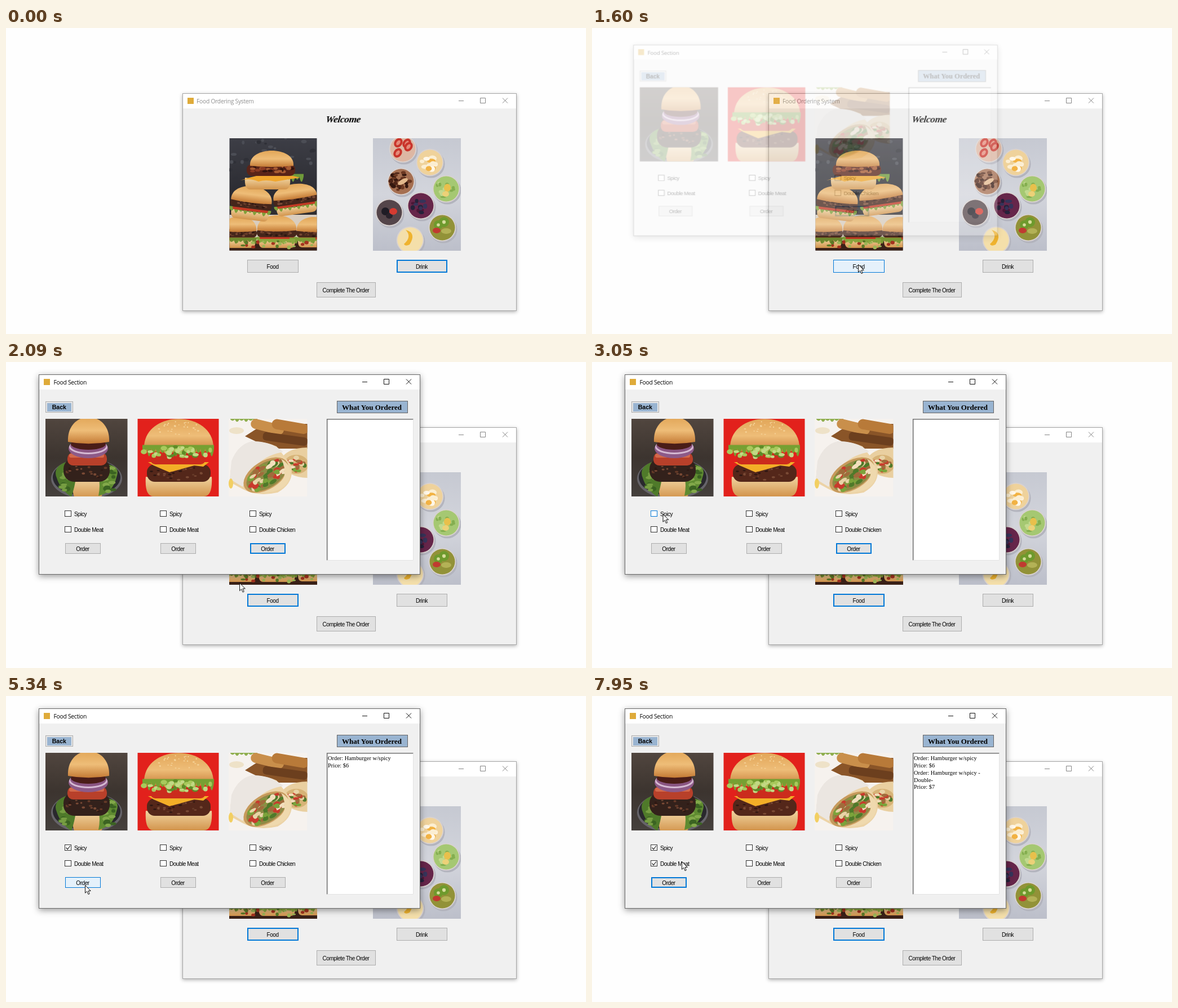
Write an HTML page that moves like this. It is 1029 px wide and 544 px high and loops after 8000 ms.

```html
<!DOCTYPE html>
<html lang="en">
<head>
<meta charset="utf-8">
<title>Food Ordering System</title>
<style>
html, body { margin: 0; width: 100%; height: 100%; overflow: hidden; background: #fefefe; }
#stage { display: block; width: 100vw; height: 100vh; }
text { font: 10px "Liberation Sans", Arial, sans-serif; letter-spacing: -.45px; fill: #000; }
.mid { text-anchor: middle; }
.title { font: 10.3px "Open Sans", "Noto Sans", sans-serif; letter-spacing: -.27px; }
.welcome { font: italic bold 17.5px "Liberation Serif", serif; letter-spacing: -.4px; }
.back { font-weight: bold; font-size: 10.6px; letter-spacing: 0; }
.head { font: bold 13px "Liberation Serif", serif; letter-spacing: 0; }
.list { font: 10.4px "Liberation Serif", serif; letter-spacing: 0; }
.frame { fill: #f0f0f0; stroke: #a6a6a6; filter: drop-shadow(0 2px 3px rgba(0,0,0,.3)); }
.frame.top { stroke: #686868; filter: drop-shadow(0 3px 6px rgba(0,0,0,.4)); }
.icons { fill: none; stroke: #858585; }
.top + .bar + .icons { stroke: #111; }
.bar { fill: #fff; }
.btn { fill: #e1e1e1; stroke: #adadad; }
.ring { fill: none; opacity: var(--ring, 0); }
.box { fill: #fff; stroke: #333; }
.tick { fill: none; stroke: #222; stroke-width: 1.2; }
#foodWin { transform-origin: 397px 200px; }
</style>
</head>
<body>
<svg id="stage" viewBox="0 0 1029 544" preserveAspectRatio="none"></svg>
<script>
const LOOP = 8000;

// ---------- drawing helpers ----------
const rect = (x, y, w, h, attr = '') => `<rect x="${x}" y="${y}" width="${w}" height="${h}" ${attr}/>`;
const text = (x, y, cls, str, id = '') => `<text x="${x}" y="${y}" class="${cls}" id="${id}">${str}</text>`;
const path = (d, fill, attr = '') => `<path d="${d}" fill="${fill}" ${attr}/>`;
const oval = (x, y, rx, ry, fill, attr = '') => `<ellipse cx="${x}" cy="${y}" rx="${rx}" ry="${ry}" fill="${fill}" ${attr}/>`;
const turn = (a, x, y, body) => `<g transform="rotate(${a} ${x} ${y})">${body}</g>`;
const photo = (x, y, w, h, body) =>
  `<svg x="${x}" y="${y}" width="${w}" height="${h}" viewBox="${x} ${y} ${w} ${h}">${body}</svg>`;

let seed = 7;
const rand = () => (seed = seed * 16807 % 2147483647) / 2147483647;
const specks = (n, x, y, rx, ry, fills, r) => Array.from({ length: n }, () => {
  const a = rand() * 6.283, d = Math.sqrt(rand());
  return oval(x + Math.cos(a) * d * rx, y + Math.sin(a) * d * ry, r * (.6 + rand() * .7), r * (.4 + rand() * .5),
    fills[Math.floor(rand() * fills.length)]);
}).join('');

function frill(x, y, w, h, fill) {
  const n = Math.max(3, Math.round(w / 8)), s = w / n;
  let d = `M${x} ${y}`;
  for (let i = 0; i < n; i++) d += `q${s / 2} ${h * (i % 2 ? 2.1 : 1.2)} ${s} 0`;
  return path(`${d}v${-h / 2}H${x}z`, fill);
}
const bunTop = (x, y, w, h) => path(`M${x} ${y + h}C${x - w * .04} ${y - h * .33} ${x + w * 1.04} ${y - h * .33} ${x + w} ${y + h}Q${x + w / 2} ${y + h * 1.15} ${x} ${y + h}z`, 'url(#bun)');
const bunLow = (x, y, w, h) => path(`M${x} ${y}Q${x + w / 2} ${y + h * .3} ${x + w} ${y}q2 ${h} -${w * .12} ${h}H${x + w * .12}q-${w * .14} 0 -${w * .12} -${h}z`, 'url(#low)');
const patty = (x, y, w, h, fill = '#46261b') =>
  rect(x, y, w, h, `rx="${h * .45}" fill="${fill}"`) +
  specks(26, x + w / 2, y + h / 2, w * .45, h * .38, ['#653a28', '#2e1712', '#7a4a35'], 2.4);

function burger(x, y, w, h) {
  return bunLow(x + w * .05, y + h * .72, w * .9, h * .28) +
    frill(x, y + h * .72, w, h * .12, '#7fa03a') +
    rect(x + w * .07, y + h * .64, w * .86, h * .1, 'rx="3" fill="#c23a24"') +
    patty(x, y + h * .4, w, h * .27) + bunTop(x + w * .01, y, w * .98, h * .46);
}

function stack() {
  return rect(396, 196, 156, 200, 'fill="url(#slate)"') +
    specks(40, 474, 240, 85, 50, ['#4b4d55', '#2f3037'], 4) +
    rect(396, 332, 156, 50, 'fill="#d9cdbf"') + rect(396, 378, 156, 18, 'fill="#3a2118"') +
    burger(383, 335, 62, 56) + burger(515, 336, 62, 54) + burger(445, 333, 71, 58) +
    frill(396, 376, 48, 7, '#6f8a2f') + frill(503, 376, 46, 7, '#7d9a35') + frill(447, 378, 66, 6, '#8aa83e') +
    specks(20, 474, 385, 76, 6, ['#5a7a26', '#9db657', '#a5331f'], 4) +
    turn(7, 434, 310, burger(398, 281, 74, 60)) + turn(-8, 514, 305, burger(474, 277, 79, 54)) +
    bunLow(424, 266, 80, 21) + frill(498, 264, 30, 9, '#6f9a3a') +
    path('M416 271Q468 252 522 266Q500 269 478 273Q460 269 448 273Q432 266 416 271z', '#f0a62e') +
    rect(427, 242, 86, 21, 'rx="9" fill="#5a2418"') +
    specks(26, 470, 252, 40, 9, ['#8b3a22', '#32130e', '#a65a32'], 4) + bunTop(433, 218, 77, 27);
}

function cup(x, y, fill, topping) {
  return oval(x + 2, y + 3, 24.5, 24.5, '#b3b4be') + oval(x, y, 24.3, 24.3, '#d9d2d0') +
    oval(x, y, 22.5, 22.5, fill) + topping;
}
const kiwi = (x, y, r) => oval(x, y, r, r, '#6e9a2d') + oval(x, y, r * .35, r * .35, '#d6dc9a');

function drinks() {
  return rect(651, 196, 156, 200, 'fill="url(#stone)"') +
    cup(704, 215, '#ddb7a3', [[696, 204], [711, 205], [695, 222], [714, 211]].map(([x, y]) =>
      turn(35, x, y, oval(x, y, 7, 9, '#c9342b') + oval(x, y, 3, 5, '#e58a79'))).join('')) +
    cup(752, 239, '#efd29b', specks(13, 751, 240, 14, 13, ['#fff7e8', '#f2b243', '#fbeed2'], 6)) +
    cup(701, 273, '#a56f51', specks(32, 699, 272, 17, 16, ['#4d2417', '#34170f', '#6b3822'], 4) +
      turn(-30, 704, 273, oval(704, 273, 10, 4, '#e3b88c'))) +
    cup(781, 286, '#a5c872', specks(14, 778, 287, 16, 15, ['#c2d98f', '#84ae50'], 4) + oval(783, 284, 6, 7, '#e8c04c') + oval(780, 295, 6, 5, '#ecd178')) +
    cup(680, 328, '#54454a', oval(673, 326, 7, 7, '#1f1c25') + oval(680, 334, 6, 5, '#29222b') + oval(687, 326, 7, 6, '#d53b31')) +
    cup(736, 316, '#66264a', specks(13, 732, 318, 13, 13, ['#25223a', '#36345a', '#4a1736'], 5)) +
    cup(774, 355, '#929238', kiwi(777, 345, 9) + kiwi(767, 350, 8) + oval(764, 360, 7, 5, '#c03b30') + oval(781, 361, 9, 5, '#b3b156')) +
    cup(717, 377, '#f4dfaa', path('M709 359Q729 364 716 385Q708 389 706 384Q721 371 709 359z', '#efb32e'));
}

function darkBurger() {
  return rect(69, 100, 147, 140, 'fill="url(#dusk)"') +
    oval(143, 207, 63, 36, '#66646a') + oval(143, 205, 60, 33, '#29282d') +
    bunLow(118, 206, 54, 36) +
    path('M106 178Q82 187 90 206Q96 226 116 240Q122 222 124 206z', '#4f7a2a') +
    path('M178 182Q204 184 196 205Q190 232 164 238Q168 218 164 206z', '#5f8b31') +
    specks(16, 104, 208, 11, 24, ['#769d42', '#3b6322'], 5) + specks(18, 183, 208, 13, 24, ['#82a84a', '#3b6322'], 5) +
    patty(102, 171, 82, 42, '#33211b') +
    rect(109, 161, 70, 23, 'rx="10" fill="#b8402a"') + rect(112, 163, 62, 7, 'rx="3" fill="#d3694b"') +
    oval(146, 154, 35, 17, '#8d5a88') + oval(146, 151, 34, 13, '#d5b9d2') + oval(146, 149, 32, 12, '#8a5582') +
    oval(146, 146, 31, 10, '#4a1d18') + bunTop(110, 98, 73, 44);
}

function redBurger() {
  return rect(233, 100, 146, 140, 'fill="#e2211c"') + bunLow(248, 204, 117, 35) +
    patty(250, 182, 113, 31, '#54271a') +
    path('M252 178H360L350 186 334 184 290 196 262 184z', '#f3ae27') +
    rect(256, 162, 98, 20, 'rx="9" fill="#cb2c1d"') +
    bunTop(245, 101, 123, 56) + frill(242, 154, 127, 13, '#76a032') +
    specks(40, 305, 160, 62, 10, ['#a8c95c', '#5d8b27', '#c2d884'], 5) +
    specks(26, 306, 119, 40, 13, ['#f6d59c'], 1.5);
}

function wrap() {
  const mix = ['#f2dfbd', '#7ba33b', '#c93a2c', '#a06c3c', '#e8d3a6', '#4f7a2a'];
  return rect(394, 100, 141, 140, 'fill="#f6f2ee"') +
    frill(398, 102, 48, 4, '#8fae4e') + oval(409, 122, 13, 6, '#eee2c8') +
    path('M424 132L458 110H535V154H470z', '#8a5528') +
    turn(14, 462, 122, rect(432, 106, 60, 18, 'rx="9" fill="#c98f4b"')) +
    turn(10, 505, 122, rect(470, 106, 66, 18, 'rx="9" fill="#b87a39"')) +
    turn(8, 500, 140, rect(455, 130, 80, 15, 'rx="6" fill="#6c3f1e"')) +
    path('M484 178Q496 152 536 152V206Q500 206 484 178z', '#e9cfa0') +
    oval(515, 182, 22, 17, '#d7b377') + specks(22, 516, 182, 18, 13, mix, 4.5) +
    path('M398 214Q396 182 412 156Q436 132 480 150L505 182Q514 214 482 232Q446 240 420 226z', '#ecd3a6') +
    path('M400 176Q412 146 436 141Q470 140 492 160Q466 164 448 180Q428 198 420 222L397 208z', '#ebe6e1') +
    turn(-32, 461, 201, oval(461, 201, 44, 25, '#c79a5c') + oval(462, 202, 40, 22, '#8f8a45') +
      specks(60, 462, 202, 37, 19, mix, 6)) +
    path('M488 172Q508 184 504 204Q496 232 456 232Q486 222 494 202Q496 186 488 172z', '#efd9ae') +
    oval(399, 216, 4, 9, '#f2cf62');
}

// ---------- window parts ----------
function shell(x, y, w, h, cls, id) {
  const r = Math.ceil(x + w), m = y + 13;
  return rect(x, y, w, h, `class="frame ${cls}" id="${id}"`) +
    rect(x + .5, y + .5, w - 1, 26, 'class="bar"') +
    `<path class="icons" id="${id}Icons" d="M${r - 103} ${m}h9M${r - 64.5} ${m - 5}h9v9h-9zM${r - 25} ${m - 5}l9 9m0-9l-9 9"/>` +
    rect(x + 8.5, y + 7.5, 11, 11, 'fill="#dfab3a"');
}
const button = (x, y, w, h, label, id) =>
  `<g class="btn" id="${id}">${rect(x, y, w, h)}${rect(x + 1, y + 1, w - 2, h - 2, 'class="ring"')}</g>` +
  text(x + w / 2 - .5, y + h / 2 + 4, 'mid', label);
const check = (x, y, label, id) => rect(x, y, 11, 10, `class="box" id="${id}"`) +
  `<path class="tick" id="${id}Tick" opacity="0" d="M${x + 2} ${y + 5}l2.7 3 4.6-6"/>` + text(x + 16.4, y + 9, '', label);
const lines = (y, id, rows) => `<g id="${id}">${rows.map((s, i) => text(571, y + i * 12.8, 'list', s)).join('')}</g>`;
const fade = (id, stops) => `<linearGradient id="${id}" x2="0" y2="1">${stops.map((c, i) =>
  `<stop offset="${i / (stops.length - 1)}" stop-color="${c}"/>`).join('')}</linearGradient>`;

const defs = `<defs>${fade('bun', ['#e2a658', '#eebd78', '#c47a35'])}${fade('low', ['#f1d5a2', '#d2944c'])}
${fade('slate', ['#3d3e46', '#2b2b31', '#3a3431'])}${fade('stone', ['#c6c9d2', '#d3d5dc', '#bcbfca'])}
${fade('dusk', ['#51463f', '#3c342f', '#45403d'])}</defs>`;

const mainWin = shell(313.5, 116.5, 592, 386, '', 'mainFrame') +
  text(338, 134, 'title', 'Food Ordering System', 'mainTitle') +
  `<g transform="translate(597.5 168) skewX(-8)">${text(0, 0, 'welcome mid', 'Welcome')}</g>` +
  photo(396.5, 196, 155, 199.5, stack()) + photo(651.5, 196, 155, 199.5, drinks()) +
  button(428.5, 412.5, 90, 22, 'Food', 'food') + button(693.5, 412.5, 89, 22, 'Drink', 'drink') +
  button(551.5, 452.5, 104, 26, 'Complete The Order', 'done');

const columns = [[104.5, 'Double Meat'], [273.5, 'Double Meat'], [432.5, 'Double Chicken']];
const foodWin = shell(58.5, 22.5, 676, 355, 'top', 'foodFrame') + text(84.5, 40, 'title', 'Food Section') +
  rect(70.5, 70.5, 48, 19, 'fill="#e8e8e8" stroke="#adadad"') + rect(73, 73, 43, 15, 'fill="#99b4d1"') +
  text(94.3, 84, 'back mid', 'Back') +
  rect(587.5, 69.5, 125, 21, 'fill="#99b4d1" stroke="#646464"') + text(649, 85, 'head mid', 'What You Ordered') +
  rect(569, 101, 154, 252, 'fill="#fff"') +
  '<path d="M569.7 352.5V101.7H722.5" fill="none" stroke="#747474" stroke-width="1.6"/>' +
  '<path d="M570 352.5H722.5V102" fill="none" stroke="#e3e3e3"/>' +
  photo(70, 101, 145.5, 138, darkBurger()) + photo(233.5, 101, 144, 138, redBurger()) + photo(395, 101, 139.5, 138, wrap()) +
  columns.map(([x, extra], i) => check(x, 264.5, 'Spicy', 'spicy' + i) + check(x, 292.5, extra, 'extra' + i) +
    button(x + 1, 322.5, 62, 18, 'Order', 'order' + i)).join('') +
  lines(114, 'list1', ['Order: Hamburger w/spicy', 'Price: $6']) +
  lines(139.7, 'list2', ['Order: Hamburger w/spicy -', 'Double-', 'Price: $7']);

document.getElementById('stage').innerHTML = defs + `<g>${mainWin}</g><g id="foodWin">${foodWin}</g>
<g id="cursor"><path d="M.5.5V14.2L3.7 11.2 6 16.6 8.2 15.6 6 10.4H10.2z" fill="#fff" stroke="#000" stroke-width=".95"/></g>`;

// ---------- timeline: [ms, state] ----------
const states = {
  plain: 'fill:#e1e1e1;stroke:#adadad;--ring:0',
  focus: 'fill:#e1e1e1;stroke:#0078d7;--ring:1',
  hover: 'fill:#e5f1fb;stroke:#0078d7;--ring:0',
  press: 'fill:#cce4f7;stroke:#005499;--ring:0',
  idle: 'fill:#fff;stroke:#333', over: 'fill:#fff;stroke:#0078d7', down: 'fill:#cce4f7;stroke:#005499',
  off: 'opacity:0', on: 'opacity:1',
  dim: 'fill:#8f8f8f', lit: 'fill:#000', grey: 'stroke:#858585', black: 'stroke:#111',
  rest: 'stroke:#a6a6a6;filter:drop-shadow(0 2px 3px rgba(0,0,0,.3))',
  active: 'stroke:#686868;filter:drop-shadow(0 3px 6px rgba(0,0,0,.4))'
};
let css = '';
function animate(id, frames, easing = 'step-end') {
  const all = [...frames, [LOOP, frames.at(-1)[1]]];
  css += `@keyframes ${id}{${all.map(([ms, s]) => `${ms / LOOP * 100}%{${states[s] || s}}`).join('')}}
#${id}{animation:${id} ${LOOP}ms ${easing} infinite}`;
}

animate('mainFrame', [[0, 'rest'], [1330, 'active'], [1470, 'rest']]);
animate('mainFrameIcons', [[0, 'grey'], [1330, 'black'], [1470, 'grey']]);
animate('mainTitle', [[0, 'dim'], [1330, 'lit'], [1470, 'dim']]);
animate('drink', [[0, 'focus'], [1330, 'plain']]);
animate('done', [[0, 'plain'], [650, 'hover'], [770, 'plain']]);
animate('food', [[0, 'plain'], [890, 'hover'], [1330, 'press'], [1470, 'hover'], [2030, 'focus']]);

const pop = (o, k) => `opacity:${o};transform:scale(${k})`;
animate('foodWin', [[0, pop(0, .92)], [1600, pop(.25, .955)], [1670, pop(.6, .983)], [1750, pop(.89, .9957)], [1810, pop(1, 1)]]);

animate('spicy0', [[0, 'idle'], [2950, 'over'], [3510, 'down'], [3580, 'over'], [4120, 'idle']]);
animate('spicy0Tick', [[0, 'off'], [3580, 'on']]);
animate('extra0', [[0, 'idle'], [4260, 'over'], [5000, 'idle'], [6140, 'over'], [6670, 'down'], [6740, 'over'], [6880, 'idle']]);
animate('extra0Tick', [[0, 'off'], [6740, 'on']]);
animate('order0', [[0, 'plain'], [5030, 'hover'], [5210, 'press'], [5340, 'hover'], [5800, 'focus'], [6670, 'plain'],
  [6970, 'hover'], [7410, 'press'], [7550, 'hover'], [7820, 'focus']]);
animate('order2', [[0, 'focus'], [3510, 'plain']]);
animate('list1', [[0, 'off'], [5340, 'on']]);
animate('list2', [[0, 'off'], [7550, 'on']]);

const moves = [[0, 960, 575], [370, 960, 575], [390, 917, 534], [640, 680, 482], [820, 535, 440], [1000, 472, 420], [1860, 472, 420],
  [2060, 424, 398], [2300, 347, 355], [2700, 180, 287], [2950, 131, 272], [3050, 125.5, 270], [3170, 125.5, 270], [3310, 125, 267.5], [3960, 125, 267.5],
  [4330, 132, 299], [4900, 132, 299], [5070, 140, 336], [5470, 140, 336], [5800, 136, 322], [6000, 132, 306],
  [6120, 132, 306], [6340, 130.5, 299], [6800, 130.5, 299], [7010, 138, 326], [7140, 139, 333], [7410, 138, 327],
  [7700, 138, 327], [7750, 141, 334], [7950, 159, 294]];
animate('cursor', moves.map(([ms, x, y]) => [ms, `transform:translate(${x}px,${y}px)`]), 'linear');

document.head.appendChild(document.createElement('style')).textContent = css;
</script>
</body>
</html>
```
